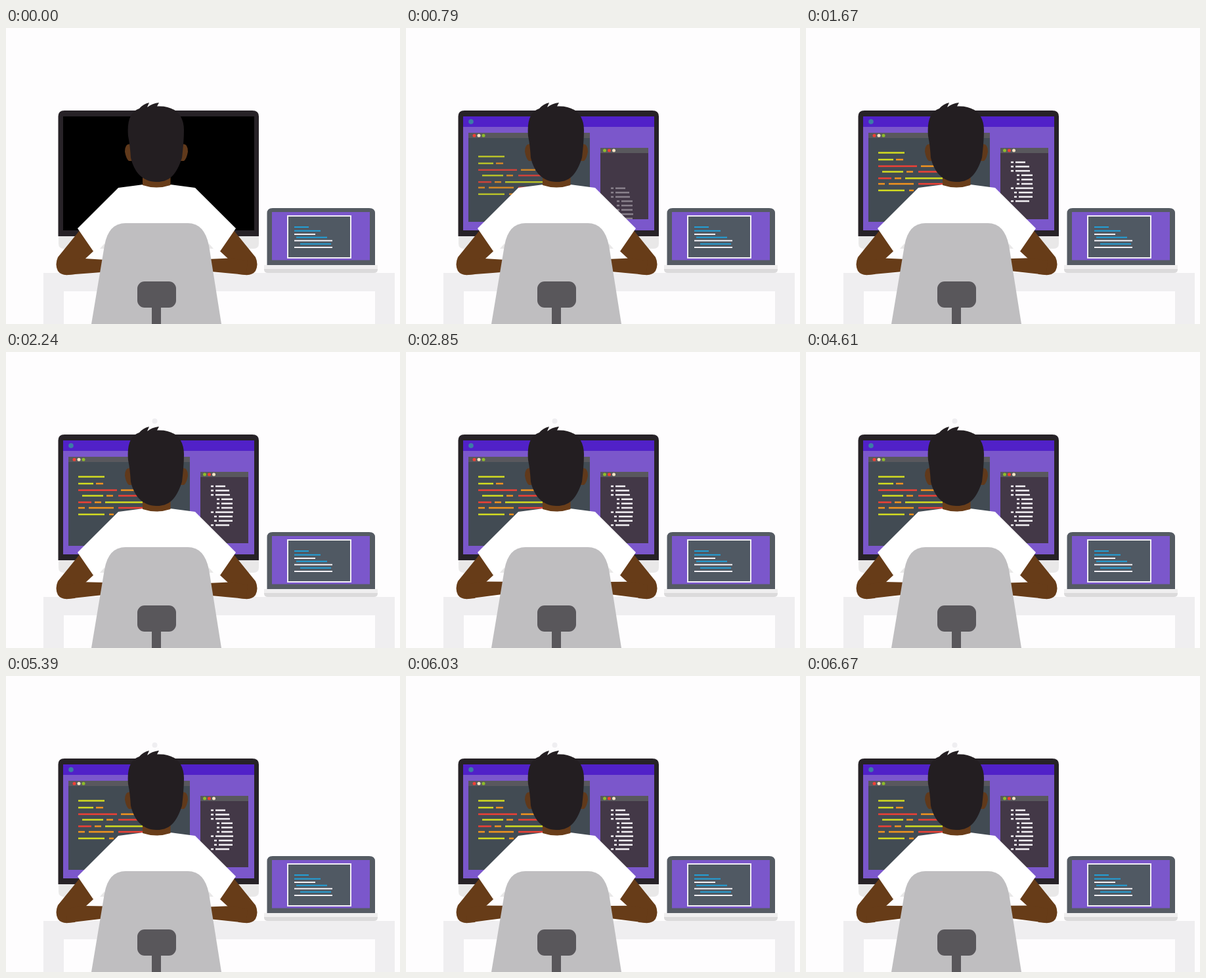
An HTML page for the animation above (6.73 s loop, 600 by 452 pixels).

```html
<!DOCTYPE html>
<html lang="en">
<head>
<meta charset="utf-8">
<title>Coding at the desk</title>
<style>
html, body { margin: 0; height: 100%; overflow: hidden; background: #fefdfe; }
svg { display: block; }
</style>
</head>
<body>
<svg width="600" height="452" viewBox="0 0 600 452">
  <defs>
    <clipPath id="leftClip"><rect x="95" y="168" width="185" height="128"/></clipPath>
    <clipPath id="rightClip"><rect x="296" y="191" width="73" height="101"/></clipPath>
    <path id="upperArm" d="M113 308 79 350Q74 361 79 371 84 378 95 377L105 376 121 352 134 340Z"/>
    <path id="forearm" d="M92 377 152 372.500V354L119 352 92 355Z"/>
    <path id="ear" d="M192 178Q181 174 181 189 183 200 187 203H194Z"/>
  </defs>

  <!-- desk -->
  <path fill="#efeef0" d="M57 374H592V452H562V402H88V452H57Z"/>

  <!-- monitor -->
  <path fill="#e9e8e8" d="M80 316H385V329Q385 337 377 337H88Q80 337 80 329Z"/>
  <path fill="#272227" d="M79.500 318V135Q79.500 126 89 126H375Q385 126 385 135V318Z"/>
  <path d="M87 135H378V309H87Z"/>
  <g id="screen">
    <path fill="#7b57cb" d="M87 135H378V309H87Z"/>
    <path fill="#5121c8" d="M87 135H378V151H87Z"/>
    <circle cx="99" cy="143" r="3.800" fill="#3c7da6"/>
  </g>
  <g id="leftWin">
    <path fill="#424b53" d="M95 160H280V296H95Z"/>
    <path fill="#59585d" d="M95 160H280V168H95Z"/>
    <g clip-path="url(#leftClip)"><g id="leftCode"></g></g>
  </g>
  <g id="rightWin">
    <path fill="#433847" d="M296 183H369V292H296Z"/>
    <path fill="#59585d" d="M296 183H369V191H296Z"/>
    <g clip-path="url(#rightClip)"><g id="rightCode"></g></g>
  </g>
  <circle id="dot" cx="226.500" cy="105.500" r="4" fill="#efeef1"/>

  <!-- laptop -->
  <path fill="#555b63" d="M397.500 362V283Q397.500 275 406 275H553Q562 275 562 283V362Z"/>
  <path fill="#7b57cb" d="M405 281H554V354.500H405Z"/>
  <path fill="#505963" stroke="#f2eef6" stroke-width="2" d="M429 287H525V351H429Z"/>
  <g id="laptopCode"></g>
  <path fill="#dbdadb" d="M393 365H566V369Q566 374 560 374H399Q393 374 393 369Z"/>
  <path fill="#efeeef" d="M393 362H566V368H393Z"/>

  <!-- person -->
  <g fill="#673c18">
    <use href="#upperArm"/>
    <use href="#forearm" id="leftArm"/>
    <g transform="translate(459) scale(-1 1)">
      <use href="#upperArm"/>
      <use href="#forearm" id="rightArm"/>
    </g>
  </g>
  <path fill="#fff" d="M171 244 209 239H250L288 244 350 306 326 341 316 337 309 329V345H150V329L143 337 133 341 109 306Z"/>
  <path fill="#693d19" d="M208 215H250.500V240Q229 247 208 240Z"/>
  <g fill="#60391b">
    <use href="#ear"/>
    <use href="#ear" transform="translate(458) scale(-1 1)"/>
  </g>
  <path fill="#231e21" d="M186 165C184 141 190 127 203 123Q209 116 218 114L215 121Q223 115 233 114L230 119.500C255 118 271 131 271 156Q271 172 268 198C260 223 250 235 229 235S195 220 190 198Q189 180 186 165Z"/>

  <!-- chair -->
  <path fill="#bfbec0" d="M130 452 150 332Q156 298 182 298H277Q302 298 309 332L328 452Z"/>
  <path fill="#59575b" d="M222 420H236V452H222Z"/>
  <rect x="200" y="387" width="59" height="40" rx="11" fill="#59575b"/>
</svg>
<script>
const LOOP = 6730;
const $ = id => document.getElementById(id);
const colors = {
  y: '#d3dc20', o: '#f2931e', r: '#ee4035',
  w: '#f4f1f5', b: '#229fd6', c: '#f3e3c4', g: '#8dbb2b'
};

// Each row: y, then "color x1 x2" segments
function addCode(id, width, rows) {
  $(id).innerHTML = rows.map(([y, ...segs]) => segs.map(seg => {
    const [c, x1, x2] = seg.split(' ');
    return `<path stroke="${colors[c]}" stroke-width="${width}" d="M${x1} ${y}H${x2}"/>`;
  }).join('')).join('');
}

function addButtons(id, x, y, order) {
  [...order].forEach((c, i) => $(id).insertAdjacentHTML('beforeend',
    `<circle cx="${x + i * 7}" cy="${y}" r="2.5" fill="${colors[c]}"/>`));
}

addCode('leftCode', 2.5, [
  [190.5, 'y 110 150'],
  [201, 'y 110 133', 'o 137 148'],
  [211, 'r 110 169', 'o 175 197'],
  [219.5, 'y 116 148', 'o 153 163', 'r 171 208'],
  [229.5, 'r 110 130', 'o 135 145', 'y 151 212'],
  [238, 'o 110 120', 'o 126 164', 'r 171 212'],
  [248, 'y 110 150', 'o 157 164', 'r 171 208']
]);
// Indent and line end of every row, set 6.6 px apart
addCode('rightCode', 2.5, [
  [312, 334], [312, 340], [312, 341], [321, 345], [321, 345],
  [321, 345], [312, 346], [317, 345], [317, 345], [312, 340]
].map(([x, end], i) => [205 + i * 6.6, `w ${x} ${x + 4}`, `w ${x + 7} ${end}`]));
addCode('laptopCode', 2, [
  [304, 'b 439 461'], [309.7, 'b 439 479'], [315, 'w 439 471'], [319.7, 'b 442 489'],
  [324.7, 'w 439 497'], [329.8, 'b 448 495'], [335, 'w 439 497']
]);
addButtons('leftWin', 104, 164.3, 'rcg');
addButtons('rightWin', 302.5, 187, 'grc');

const progress = (t, from, to) => Math.min(1, Math.max(0, (t - from) / (to - from)));
const easeOut = p => 1 - (1 - p) ** 3;

function popWindow(id, p, x, y) {
  const s = easeOut(p);
  $(id).setAttribute('transform', `translate(${x} ${y}) scale(${s}) translate(${-x} ${-y})`);
  $(id).setAttribute('opacity', Math.min(1, p * 2));
}

function slideCode(id, p, distance, fade) {
  $(id).setAttribute('transform', `translate(0 ${distance * (1 - easeOut(p))})`);
  $(id).setAttribute('opacity', Math.min(1, p * fade));
}

function liftArm(id, phase) {
  const lift = Math.sqrt((1 - Math.cos(phase * 2 * Math.PI)) / 2);
  $(id).setAttribute('transform', `rotate(${-3.2 * lift} 92 366)`);
}

function draw(now) {
  const t = now % LOOP;
  $('screen').setAttribute('opacity', progress(t, 30, 250));
  popWindow('leftWin', progress(t, 150, 500), 187.5, 228);
  popWindow('rightWin', progress(t, 300, 650), 332.5, 237.5);
  slideCode('leftCode', progress(t, 600, 1000), 40, 1.7);
  slideCode('rightCode', progress(t, 700, 1300), 65, 2.6);
  $('dot').setAttribute('opacity', progress(t, 1700, 1900));
  liftArm('leftArm', t / 800);
  liftArm('rightArm', t / 800 + 0.1);
  requestAnimationFrame(draw);
}
draw(0);
</script>
</body>
</html>
```
